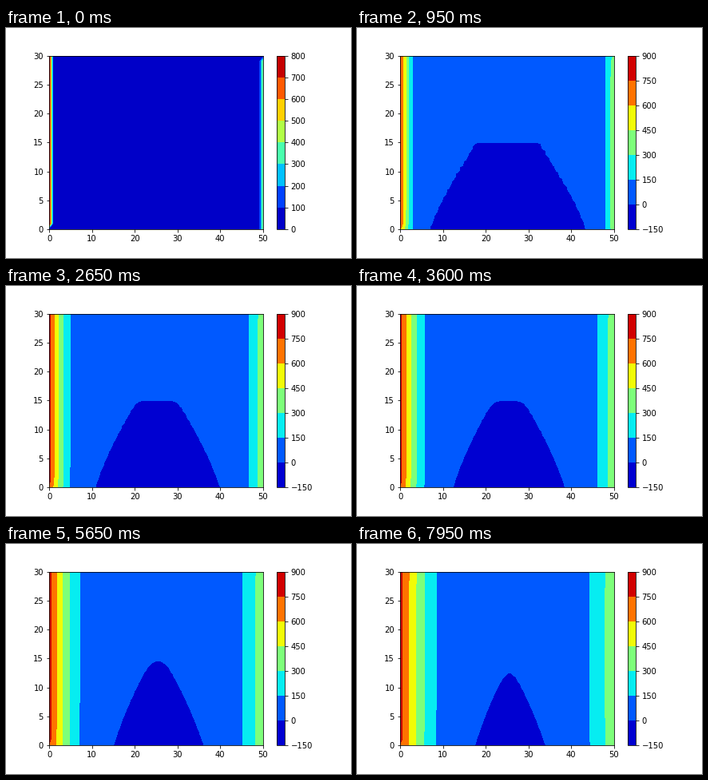
A matplotlib script for the animation above (8000 ms loop, 432 by 288 pixels).

```python
import numpy as np
import matplotlib.pyplot as plt
from matplotlib.animation import FuncAnimation

W, H, DPI = 432, 288, 72
FRAMES, INTERVAL = 160, 50
NX, NY = 51, 31
HOT, WARM = 800.0, 400.0   # fixed temperatures of the left and right walls
RATE = 0.128               # alpha * dt / dx^2
FLUX = 1.0                 # heat entering at the top, leaving at the bottom


def hold_walls(u):
    u[1:, 0] = HOT
    u[:-1, -1] = WARM
    return u


def step(u):
    p = np.pad(u, 1, mode="reflect")
    p[0] -= 2 * FLUX
    p[-1] += 2 * FLUX
    vert = p[:-2, 1:-1] + p[2:, 1:-1]
    horiz = p[1:-1, :-2] + p[1:-1, 2:]
    return hold_walls(u + RATE * (vert + horiz - 4 * u))


def simulate():
    states = [hold_walls(np.zeros((NY, NX)))]
    while len(states) < FRAMES:
        states.append(step(states[-1]))
    return states


def levels_for(i):
    return START if i == 0 else LATER


START = np.arange(0, 801, 100)
LATER = np.arange(-150, 901, 150)
states = simulate()

fig = plt.figure(figsize=(W / DPI, H / DPI), dpi=DPI, facecolor="white")
BOTTOM, HEIGHT = 0.125, 0.755
ax = fig.add_axes([0.125, BOTTOM, 0.62, HEIGHT])


def fill(i):
    return ax.contourf(states[i], levels=levels_for(i), cmap="jet")


def make_bar(i):
    width = HEIGHT * H / 20 / W
    cax = fig.add_axes([0.78375, BOTTOM, width, HEIGHT], label=f"bar{i}")
    cs = fill(i)
    fig.colorbar(cs, cax=cax, ticks=levels_for(i))
    cs.remove()
    return cax


bars = [make_bar(0), make_bar(1)]
shown = []


def draw(i):
    while shown:
        shown.pop().remove()
    shown.append(fill(i))
    bars[0].set_visible(i == 0)
    bars[1].set_visible(i > 0)
    return shown


anim = FuncAnimation(fig, draw, frames=FRAMES, interval=INTERVAL,
                     init_func=lambda: draw(0), repeat=True, repeat_delay=0)
plt.show()
```
